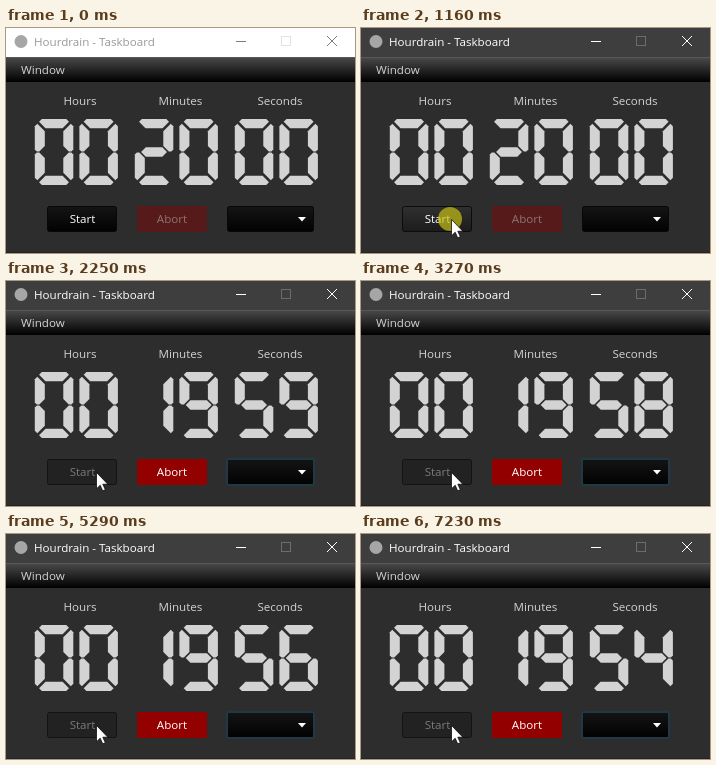
An HTML page that plays this animation: 349 px wide and 225 px high, repeating every 8 s.

```html
<!DOCTYPE html>
<html lang="en">
<head>
<meta charset="utf-8">
<title>Timer</title>
<style>
  html, body { margin: 0; width: 100%; height: 100%; overflow: hidden; background: #2d2d2d; }
  svg { display: block; width: 349px; height: 225px; }
  text { font: 11.6px "Open Sans", "Noto Sans", sans-serif; fill: #d3d3d3; }
  .mid { text-anchor: middle; }

  .bar { fill: #fff; }
  .caption { fill: #999; }
  .glyph { fill: none; stroke: #7c7c7c; }
  .glyph.off { stroke: #e3e3e3; }
  .active .bar { fill: #3e3e3e; }
  .active .caption { fill: #fff; }
  .active .glyph { stroke: #fff; }
  .active .glyph.off { stroke: #6c6c6c; }

  #start rect { fill: url(#black); stroke: #080808; }
  #start text, .running #abort text { fill: #fff; }
  .hover #start rect { fill: url(#lit); stroke: #0c0c0c; }
  .running #start rect { fill: #222; stroke: #131313; }
  .running #start text { fill: #7b7b7b; }
  #abort rect { fill: #561a1a; }
  #abort text { fill: #8c7373; }
  .running #abort rect { fill: #920000; }
  #combo { fill: url(#black); stroke: #080808; }
  #focus { fill: none; stroke: #1f3946; stroke-width: 2; visibility: hidden; }
  .running #focus { visibility: visible; }
  #click { fill: #c6bf12; fill-opacity: .7; }
</style>
</head>
<body>
<svg id="app" viewBox="0 0 349 225">
  <defs>
    <linearGradient id="menu" x2="0" y2="1">
      <stop stop-color="#4b4b4b"/><stop offset="1" stop-color="#000"/>
    </linearGradient>
    <linearGradient id="black" x2="0" y2="1">
      <stop stop-color="#141414"/><stop offset="1" stop-color="#020202"/>
    </linearGradient>
    <linearGradient id="lit" x2="0" y2="1">
      <stop stop-color="#303030"/><stop offset="1" stop-color="#1c1c1c"/>
    </linearGradient>
  </defs>

  <rect width="349" height="225" fill="#2d2d2d"/>
  <rect class="bar" width="349" height="29"/>
  <circle cx="15" cy="13.5" r="6.5" fill="#a6a6a6"/>
  <text class="caption" x="28" y="18">Hourdrain - Taskboard</text>
  <path class="glyph" d="M230 13.5h10"/>
  <rect class="glyph off" x="275.5" y="8.5" width="9" height="9"/>
  <path class="glyph" d="M321 8l10 10m0-10l-10 10"/>

  <rect y="29" width="349" height="25" fill="url(#menu)"/>
  <path d="M0 29.5h349" stroke="#585858"/>
  <text x="15" y="46">Window</text>

  <text class="mid" x="74" y="77">Hours</text>
  <text class="mid" x="174.5" y="77">Minutes</text>
  <text class="mid" x="274" y="77">Seconds</text>
  <g id="digits" fill="#d3d3d3"></g>

  <g id="start">
    <rect x="41.5" y="178.5" width="69" height="25" rx="2"/>
    <text class="mid" x="76.5" y="195">Start</text>
  </g>
  <g id="abort">
    <rect x="131" y="178" width="70" height="26" rx="1"/>
    <text class="mid" x="166" y="195">Abort</text>
  </g>
  <rect id="combo" x="221.5" y="178.5" width="86" height="25" rx="2"/>
  <rect id="focus" x="221" y="178" width="87" height="26" rx="2"/>
  <path d="M292 189h8l-4 4.5z" fill="#fff"/>
  <path d="M0 224.5h349" stroke="#222"/>

  <circle id="click" cx="89" cy="191" r="12"/>
  <path id="cursor" d="M.5 .5v16.2l3.7-3.5 2.5 5.6 2.6-1.1-2.5-5.5h5z" fill="#fff" stroke="#000" stroke-width=".7"/>
</svg>

<script>
const LOOP = 8000, STEP = 80;
const TICKS = [2250, 3270, 4280, 5290, 6230, 7230];
const LIT = ["abcdef", "bc", "abdeg", "abcdg", "bcfg", "acdfg", "acdefg", "abcf", "abcdefg", "abcdfg"];
const W = 38.5, H = 66;

const CAP = "4.3,2.7 7,0 31.5,0 34.2,2.7 27.8,9.2 10.7,9.2";
const SIDE = "0,7.3 2.5,4.8 10,12.3 10,27 4.5,32.5 2,32.5 0,30.5";
const MIDDLE = "6.3,33 11,28.3 27.5,28.3 32.2,33 27.5,37.7 11,37.7";
const FLIP_X = `translate(${W} 0) scale(-1 1)`;
const FLIP_Y = `translate(0 ${H}) scale(1 -1)`;
const SEGMENTS = {
  a: [CAP, ""], d: [CAP, FLIP_Y],
  f: [SIDE, ""], b: [SIDE, FLIP_X], e: [SIDE, FLIP_Y], c: [SIDE, `${FLIP_X} ${FLIP_Y}`],
  g: [MIDDLE, ""]
};

const $ = id => document.getElementById(id);
const app = $("app"), cursor = $("cursor"), click = $("click");

function add(parent, tag, attrs) {
  const el = document.createElementNS("http://www.w3.org/2000/svg", tag);
  for (const key in attrs) el.setAttribute(key, attrs[key]);
  return parent.appendChild(el);
}

const digits = Array.from({ length: 6 }, (_, i) => {
  const x = 28.8 + 100 * (i >> 1) + 44.6 * (i % 2);
  const g = add($("digits"), "g", { transform: `translate(${x} 91)` });
  return Object.entries(SEGMENTS).map(([name, [points, transform]]) =>
    ({ name, el: add(g, "polygon", { points, transform }) }));
});

function showTime(seconds) {
  const parts = [seconds / 3600, seconds / 60 % 60, seconds % 60];
  const str = parts.map(n => String(Math.floor(n)).padStart(2, "0")).join("");
  digits.forEach((segments, i) => {
    for (const { name, el } of segments)
      el.style.visibility = LIT[str[i]].includes(name) ? "visible" : "hidden";
  });
}

function draw(t) {
  // The pointer advances in seven discrete steps and slows down.
  const p = Math.max(0, Math.min(6, Math.floor((t - 450) / STEP))) / 6;
  const ease = 1 - (1 - p) ** 1.6;
  const x = 170 - 80 * ease, y = 217 - 26 * ease;
  cursor.style.visibility = t >= 450 ? "visible" : "hidden";
  cursor.setAttribute("transform", `translate(${x.toFixed(1)} ${y.toFixed(1)})`);
  click.style.visibility = t >= 1160 && t < 1320 ? "visible" : "hidden";

  app.classList.toggle("hover", t >= 450 && x < 111);
  app.classList.toggle("active", t >= 1160);
  app.classList.toggle("running", t >= 1240);
  showTime(1200 - TICKS.filter(tick => t >= tick).length);
}

const begin = performance.now();
function loop() {
  draw((performance.now() - begin) % LOOP);
  requestAnimationFrame(loop);
}
loop();
</script>
</body>
</html>
```
